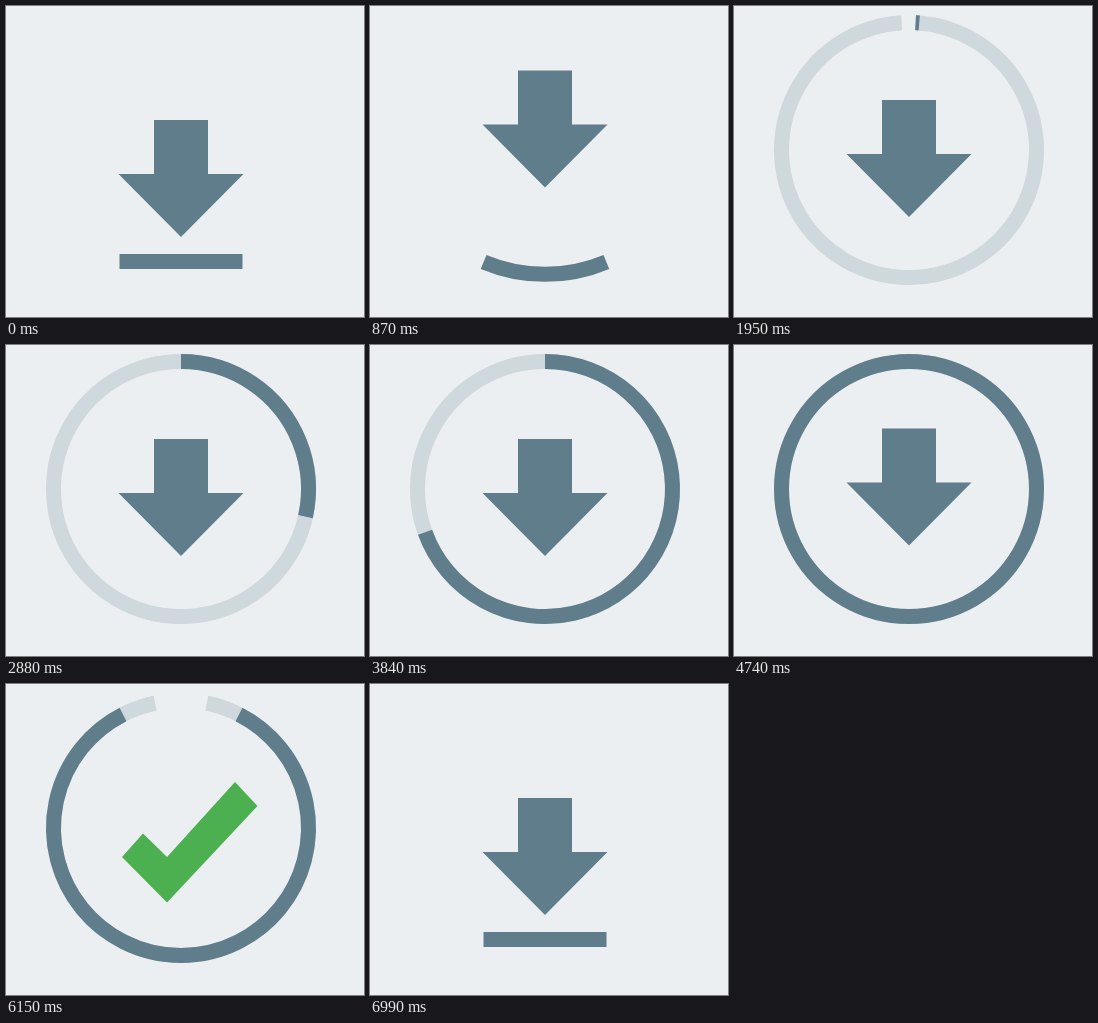
These frames come from a looping animation (358x311 px, 7350 ms). An HTML page:

```html
<!DOCTYPE html>
<html lang="en">
<head>
<meta charset="utf-8">
<title>Download button</title>
<style>
  html, body { margin: 0; width: 100%; height: 100%; overflow: hidden; background: #eceff1; }
  svg { display: block; width: 358px; height: 311px; }
  .stroke { fill: none; stroke-width: 15; }
</style>
</head>
<body>
<svg viewBox="0 0 358 311">
  <clipPath id="inside"><circle cx="175" cy="144" r="120"/></clipPath>
  <path id="track" class="stroke" stroke="#cfd8dc"/>
  <path id="line" class="stroke" stroke="#607d8b"/>
  <g clip-path="url(#inside)">
    <path id="arrow" fill="#607d8b" d="M148 114H202V168H237.5L175 231L112.5 168H148Z"/>
    <path id="check" fill="#4caf50" d="M137 149.5L161 173L229 98L251.5 122L161 218.5L116 173Z"/>
  </g>
</svg>
<script>
const LOOP = 7350, CX = 175, CY = 144, R = 127.5, BAR_HALF = 28.5;
const [track, line, arrow, check] =
  ['track', 'line', 'arrow', 'check'].map(id => document.getElementById(id));

const clamp = u => Math.min(1, Math.max(0, u));
const span = (t, from, to) => clamp((t - from) / (to - from));
const mix = (a, b, u) => a + (b - a) * u;

const linear = u => u;
const sine = u => (1 - Math.cos(Math.PI * u)) / 2;
const cubic = u => u < 0.5 ? 4 * u ** 3 : 1 - 4 * (1 - u) ** 3;
const expo = u => u <= 0 ? 0 : u >= 1 ? 1 :
  u < 0.5 ? 2 ** (20 * u - 11) : 1 - 2 ** (9 - 20 * u);
const backIn = u => u * u * (2.70158 * u - 1.70158);
const backOut = u => 1 - backIn(1 - u);
const elasticOut = u => u <= 0 ? 0 : u >= 1 ? 1 :
  1 + 2 ** (-10 * u) * Math.sin((u - 0.075) * 2 * Math.PI / 0.3);

// Value at time t along [time, value] keys
function follow(t, keys, ease = linear) {
  const i = keys.findIndex(k => k[0] > t);
  if (i < 0) return keys[keys.length - 1][1];
  if (i === 0) return keys[0][1];
  const [t0, a] = keys[i - 1], [t1, b] = keys[i];
  return mix(a, b, ease(span(t, t0, t1)));
}

// Clockwise arc, degrees measured from the top of the ring
function arc(from, to) {
  if (to - from < 0.05) return '';
  const point = deg => {
    const a = deg * Math.PI / 180;
    return `${(CX + R * Math.sin(a)).toFixed(2)} ${(CY - R * Math.cos(a)).toFixed(2)}`;
  };
  let d = 'M' + point(from);
  for (let i = 1; i <= 3; i++) d += `A${R} ${R} 0 0 1 ${point(mix(from, to, i / 3))}`;
  return d + (to - from > 359.95 ? 'Z' : '');
}

// Bar that bends from straight (0) to a piece of the ring (1)
function bar(bend) {
  const y = 255.5 + 16 * bend;
  const half = mix(61.5, BAR_HALF * Math.PI / 180 * R, bend);
  if (Math.abs(bend) < 0.005) return `M${CX - half} ${y}H${CX + half}`;
  const r = R / bend, a = half / r;
  const dx = r * Math.sin(a), endY = y - r * (1 - Math.cos(a));
  return `M${CX - dx} ${endY}A${Math.abs(r)} ${Math.abs(r)} 0 0 ${bend > 0 ? 0 : 1} ${CX + dx} ${endY}`;
}

const HOP = [[450, 0], [690, 18], [880, -50], [1090, -13], [1230, -23], [1380, -19.5], [1560, -20]];
const BEND = [[600, 0], [780, 1], [880, 0.8], [980, 1]];
const PROGRESS = [[1920, 0], [2295, 20], [2670, 70], [3450, 190], [3840, 250], [4200, 310], [4620, 360]];

function drawRing(t) {
  let trackPath = '', linePath;
  if (t < 1020) {
    linePath = bar(follow(t, BEND, sine));
  } else if (t < 5850) {
    const half = mix(BAR_HALF, 180, cubic(span(t, 1152, 2118)));
    const turn = 360 * expo(span(t, 1018, 1952));
    const tail = 180 + turn - half;
    const carried = 2 * half * (1 - sine(span(t, 1320, 1940)));
    const length = Math.max(carried, follow(t, PROGRESS));
    trackPath = t > 1320 ? arc(tail, tail + 2 * half) : '';
    linePath = arc(tail, tail + length);
  } else if (t < 6570) {
    const outer = mix(180, BAR_HALF, expo(span(t, 5910, 6570)));
    const inner = mix(180, BAR_HALF, expo(span(t, 5853, 6553)));
    trackPath = arc(180 - outer, 180 + outer);
    linePath = arc(180 - inner, 180 + inner);
  } else {
    linePath = bar(1 - elasticOut(span(t, 6570, 6990)));
  }
  track.setAttribute('d', trackPath);
  line.setAttribute('d', linePath);
}

function place(node, y) {
  node.setAttribute('transform', `translate(0 ${y.toFixed(2)})`);
}

function drawIcons(t) {
  const arrowY = t < 4650 ? follow(t, HOP, sine)
    : t < 6345 ? mix(-20, 152, backIn(span(t, 4650, 5030)))
    : mix(-210, 0, backOut(span(t, 6345, 6560)));
  const checkY = t < 6150 ? mix(-200, 0, backOut(span(t, 5010, 5370)))
    : mix(0, 170, backIn(span(t, 6150, 6345)));
  place(arrow, arrowY);
  place(check, checkY);
}

function frame(now) {
  const t = now % LOOP;
  drawRing(t);
  drawIcons(t);
  requestAnimationFrame(later => frame(later - start));
}

const start = performance.now();
frame(0);
</script>
</body>
</html>
```
